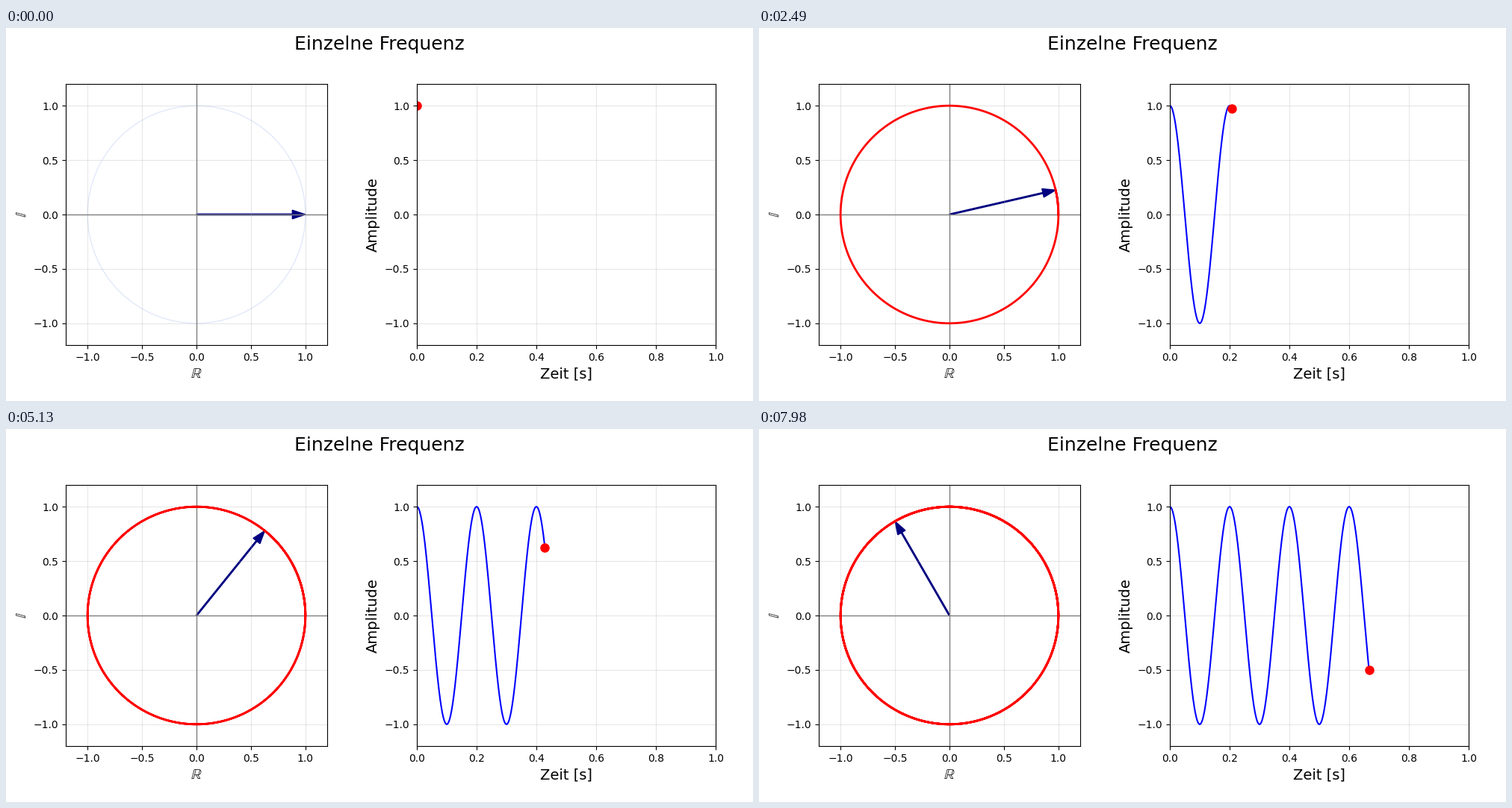
Animation of 1000x500 px, one loop 8 s. Source, as a matplotlib script:

```python
import matplotlib.pyplot as plt
import numpy as np
from matplotlib.animation import FuncAnimation
from matplotlib.patches import Circle, FancyArrow

FREQ = 5                 # Hz
SAMPLES = 1000           # points in one second of signal
STEPS = 400              # picture changes for the full second
STEP_MS = 30
LOOP_MS = 8000
INTERVAL = 20

t = np.linspace(0, 1, SAMPLES)
re = np.cos(2 * np.pi * FREQ * t)
im = np.sin(2 * np.pi * FREQ * t)

fig = plt.figure(figsize=(10, 5), dpi=100)
fig.suptitle("Einzelne Frequenz", fontsize=18)


def make_axes(rect, xlim, xlabel, ylabel):
    ax = fig.add_axes(rect)
    ax.set_xlim(*xlim)
    ax.set_ylim(-1.2, 1.2)
    ax.set_xlabel(xlabel, fontsize=14)
    ax.set_ylabel(ylabel, fontsize=14)
    ax.grid(alpha=0.3)
    return ax


# Complex plane with the rotating pointer
plane = make_axes([0.08, 0.15, 0.35, 0.7], (-1.2, 1.2),
                  r"$\mathbb{R}$", r"$\mathbb{I}$")
plane.add_patch(Circle((0, 0), 1, fill=False, ec="royalblue", lw=1, alpha=0.15))
plane.axhline(0, color="gray", lw=1)
plane.axvline(0, color="gray", lw=1)
trail, = plane.plot([], [], color="red", lw=2)
pointer = plane.add_patch(FancyArrow(
    0, 0, 1, 0, width=0.01, head_width=0.08, head_length=0.12,
    length_includes_head=True, fc="navy", ec="navy", lw=1))

# Real part over time
signal = make_axes([0.55, 0.15, 0.4, 0.7], (0, 1), "Zeit [s]", "Amplitude")
curve, = signal.plot([], [], color="blue", lw=1.5)
dot, = signal.plot([], [], "o", color="red", ms=8)


def update(frame):
    step = (frame * INTERVAL + INTERVAL // 2) // STEP_MS
    n = step * (SAMPLES - 1) // (STEPS - 1)
    trail.set_data(re[:n + 1], im[:n + 1])
    pointer.set_data(dx=re[n], dy=im[n])
    curve.set_data(t[:n + 1], re[:n + 1])
    dot.set_data([t[n]], [re[n]])
    return trail, pointer, curve, dot


anim = FuncAnimation(fig, update, frames=LOOP_MS // INTERVAL,
                     interval=INTERVAL, repeat=True, repeat_delay=0)
plt.show()
```
